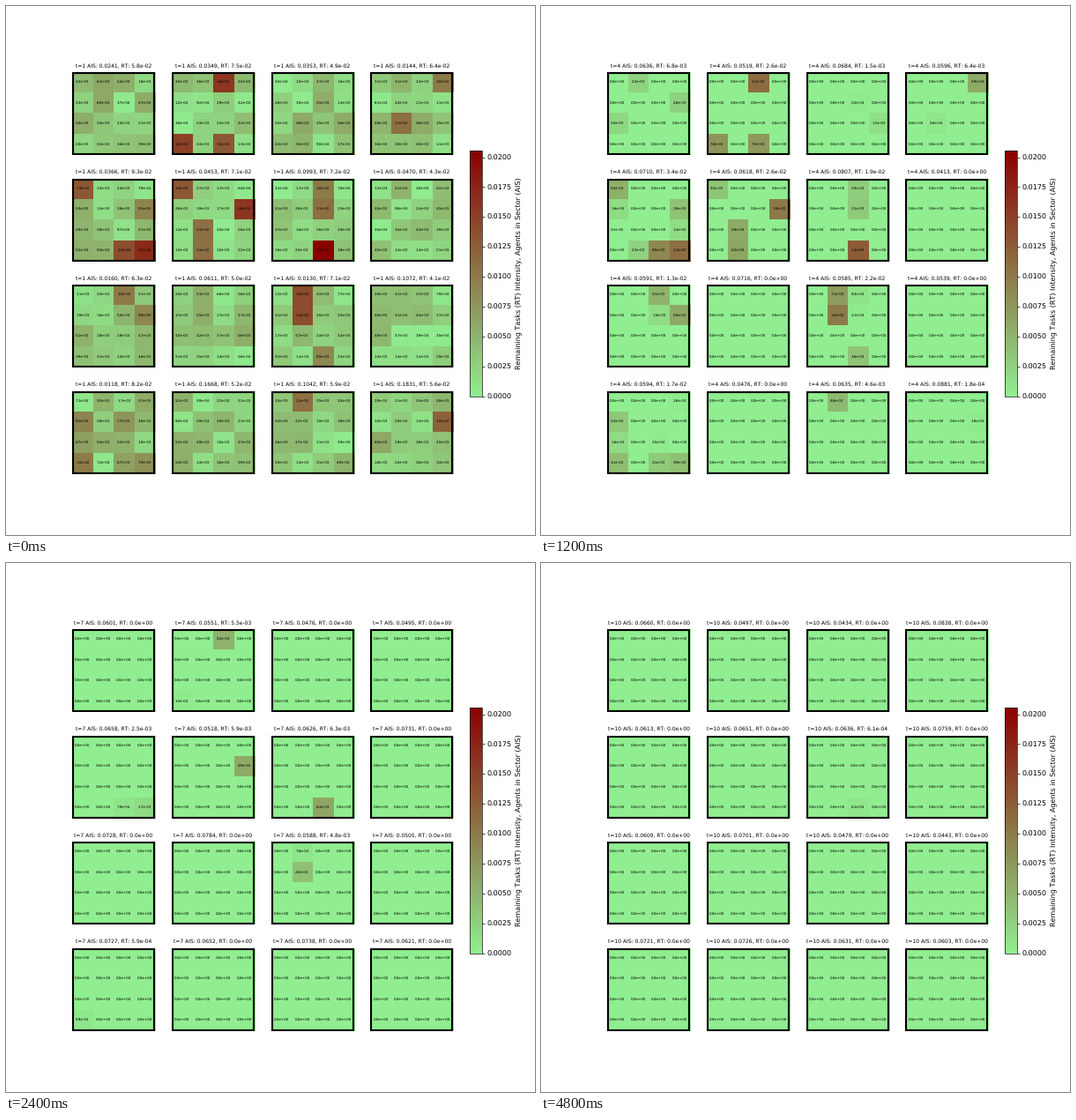
A matplotlib script that plays this animation: 600 by 600 pixels, repeating every 5200 ms.

```python
import numpy as np
import matplotlib.pyplot as plt
from matplotlib.animation import FuncAnimation
from matplotlib.colors import LinearSegmentedColormap
from matplotlib.patches import Rectangle

N = 4                 # sectors per side, and cells per side of each sector
CELLS = N * N
VMAX = 0.0206
STEPS, HOLD = 10, 3   # time steps, then a rest on the last one
SPEED = 40e-3         # mean work per cell and step if all agents were there

# State at t=1 for each sector: share of agents and remaining tasks
AGENTS = [.0241, .0349, .0353, .0144, .0366, .0453, .0993, .0470,
          .0160, .0611, .0130, .1072, .0118, .1668, .1042, .1831]
TASKS = np.array([58, 75, 49, 64, 93, 71, 72, 43,
                  63, 50, 71, 41, 82, 52, 59, 56]) * 1e-3

# Hottest cells at t=1, sector: {cell: tasks in 1e-3}
HOT = {
    1: {2: 16, 12: 15, 14: 13},
    3: {3: 10, 9: 11},
    4: {0: 13, 7: 9.1, 14: 14, 15: 17},
    5: {0: 13, 7: 16, 9: 11, 13: 11},
    6: {2: 10, 6: 11, 14: 20.6},
    8: {2: 10, 7: 8.9},
    10: {1: 14, 5: 14, 14: 8.9},
    12: {4: 9.1, 12: 10},
    14: {1: 11},
    15: {7: 12},
}


def first_cells(rng):
    """Place the hot cells and spread the rest of each total at random."""
    cells = rng.uniform(0.05, 1, (CELLS, CELLS))
    for s, total in enumerate(TASKS):
        hot = {c: v * 1e-3 for c, v in HOT.get(s, {}).items()}
        cells[s, list(hot)] = 0
        cells[s] *= (total - sum(hot.values())) / cells[s].sum()
        for c, value in hot.items():
            cells[s, c] = value
    return cells


def simulate():
    """Agents wander between sectors and work off the tasks they find."""
    rng = np.random.default_rng(7)
    agents, cells = np.array(AGENTS), first_cells(rng)
    states = [(agents, cells)]
    for _ in range(STEPS - 1):
        work = SPEED * agents[:, None] * rng.uniform(0.3, 1.7, cells.shape)
        cells = np.maximum(cells - work, 0)
        agents = rng.normal(1, 0.17, CELLS)
        agents = agents / agents.sum()
        states.append((agents, cells))
    return states


STATES = simulate()

# Unhinted glyphs keep the tiny labels readable at 60 dpi
plt.rcParams.update({"font.family": "DejaVu Sans", "text.hinting": "none",
                     "text.hinting_factor": 1})
cmap = LinearSegmentedColormap.from_list("load", ["lightgreen", "darkred"])
fig, axes = plt.subplots(N, N, figsize=(10, 10), dpi=60)
images, labels, titles = [], [], []
for ax in axes.flat:
    images.append(ax.imshow(np.zeros((N, N)), cmap=cmap, vmin=0, vmax=VMAX))
    labels.append([ax.text(i % N, i // N, "", fontsize=5,
                           ha="center", va="center") for i in range(CELLS)])
    titles.append(ax.set_title("", fontsize=7.4))
    ax.set(xticks=[], yticks=[])
    ax.spines[:].set_visible(False)
    # Clipped by the axes, so only the inner half of the line shows
    ax.add_patch(Rectangle((0, 0), 1, 1, transform=ax.transAxes,
                           fill=False, lw=5, ec="black"))

bar = fig.colorbar(images[0], ax=axes.ravel().tolist(), fraction=0.03,
                   pad=0.04, ticks=np.arange(9) * 0.0025, format="%.4f")
bar.set_label("Remaining Tasks (RT) Intensity, Agents in Sector (AIS)")


def draw(frame):
    t = min(frame + 1, STEPS)
    agents, cells = STATES[t - 1]
    for s, values in enumerate(cells):
        images[s].set_data(values.reshape(N, N))
        titles[s].set_text(
            f"t={t} AIS: {agents[s]:.4f}, RT: {values.sum():.1e}")
        for label, value in zip(labels[s], values):
            label.set_text(f"{value:.1e}")
    return images


anim = FuncAnimation(fig, draw, frames=STEPS + HOLD, interval=400,
                     repeat=True, repeat_delay=0)
plt.show()
```
